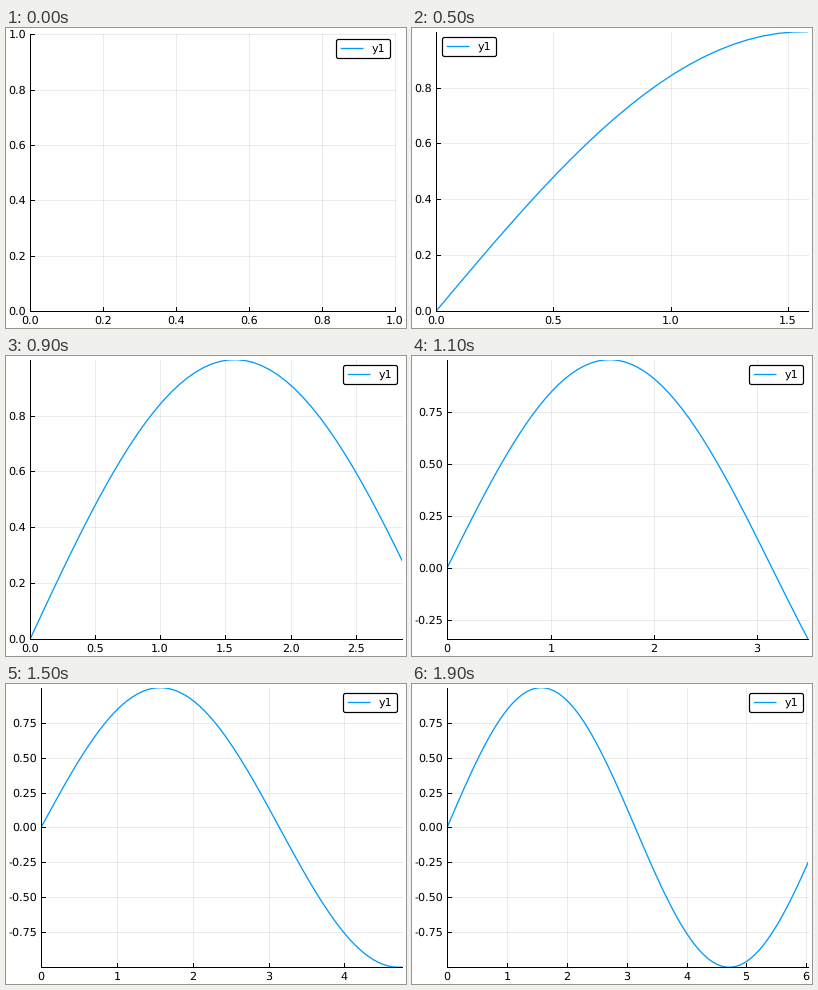
Write a matplotlib script that moves like this. It is 400 by 300 pixels and loops after 2 s.

```python
import math

import numpy as np
import matplotlib.pyplot as plt
from matplotlib.animation import FuncAnimation
from matplotlib.patches import FancyBboxPatch, Rectangle

W, H, DPI = 400, 300, 100
FRAMES, INTERVAL = 20, 100
STEP = 2 * math.pi / 99      # spacing of the sampled points
PER_FRAME = 5                # points added each frame
BLUE = "#009afa"
EM = 8 * DPI / 72
TOP, BOTTOM, RIGHT = 3.7, 283.235, 396.06
TICK = 4

plt.rcParams.update({
    "font.family": "DejaVu Sans",
    "font.size": 8,
    "text.hinting": "none",
    "axes.unicode_minus": False,
})

fig = plt.figure(figsize=(W / DPI, H / DPI), dpi=DPI, facecolor="white")
ax = fig.add_axes([0, 0, 1, 1])


def px(width):
    return width * 72 / DPI


def text_width(s):
    """Advance width of a numeric label in pixels."""
    return EM * sum({".": 0.318, "-": 0.361}.get(c, 0.636) for c in s)


def ticks(lo, hi):
    """Pick the nicest 4 to 8 ticks inside [lo, hi]."""
    best, chosen = -1, None
    span = hi - lo
    for power in (0, -1, -2):
        for q, nice in ((1, 1), (5, 0.9), (2.5, 0.5), (2, 0.7), (3, 0.2)):
            step = q * 10.0 ** power
            first = math.ceil(lo / step - 1e-9)
            last = math.floor(hi / step + 1e-9)
            n = last - first + 1
            if not 4 <= n <= 8:
                continue
            score = ((1 - abs(n - 5) / 5) / 4
                     + 0.5 * span / ((n - 1) * step) + nice / 4)
            if score > best + 1e-9:
                best = score
                chosen = [i * step for i in range(first, last + 1)]
    return chosen


def labels(values):
    for digits in range(4):
        if all(abs(round(v, digits) - v) < 1e-9 for v in values):
            return [f"{v:.{digits}f}" for v in values]


def segment(x0, y0, x1, y1, **kw):
    """Black one-pixel line on the pixel grid."""
    line, = ax.plot([x0, x1], [y0, y1], color="black", lw=px(1),
                    solid_capstyle="projecting", **kw)
    line.set_snap(True)


def draw_legend(left, top, right, at_left):
    x = round(left + 6 if at_left else right - 59)
    y = round(top + 5)
    ax.add_patch(FancyBboxPatch(
        (x + 0.5, y + 0.5), 54, 19, boxstyle="round,pad=0,rounding_size=2",
        facecolor="white", edgecolor="black", lw=px(1.2), zorder=5))
    ax.plot([x + 4.7, x + 27.5], [y + 9.5, y + 9.5], color=BLUE, lw=px(1.3),
            solid_capstyle="butt", snap=False, zorder=6)
    ax.text(x + 35.6, y + 12.5, "y1", zorder=6)


def draw(k):
    ax.clear()
    ax.set_xlim(0, W)
    ax.set_ylim(H, 0)
    ax.axis("off")

    xs = STEP * np.arange(PER_FRAME * k + 1)
    ys = np.sin(xs)
    if k:
        x_hi, y_lo, y_hi = xs[-1], ys.min(), ys.max()
        xt, yt = ticks(0, x_hi), ticks(y_lo, y_hi)
    else:
        x_hi, y_lo, y_hi = 1, 0, 1
        xt = yt = [0.2 * i for i in range(6)]
    xl, yl = labels(xt), labels(yt)

    # margins leave room for the tick labels
    left = 6.36 + max(map(text_width, yl))
    reach = 398.3 - text_width(xl[-1]) / 2
    right = min(RIGHT, left + (reach - left) * x_hi / xt[-1])
    share = (yt[-1] - y_lo) / (y_hi - y_lo)
    top = max(TOP, BOTTOM - (BOTTOM - 6.3) / share)

    def to_x(v):
        return left + (right - left) * v / x_hi

    def to_y(v):
        return BOTTOM - (BOTTOM - top) * (v - y_lo) / (y_hi - y_lo)

    for v, s in zip(xt, xl):
        x = to_x(v)
        segment(x, top, x, BOTTOM, alpha=0.08, zorder=1)
        segment(x, BOTTOM, x, BOTTOM - TICK, zorder=4)
        ax.text(round(x), 296.3, s, ha="center", va="baseline")
    for v, s in zip(yt, yl):
        y = to_y(v)
        segment(left, y, right, y, alpha=0.08, zorder=1)
        segment(left, y, left + TICK, y, zorder=4)
        ax.text(left - 4.06 - text_width(s), round(y) + 4, s, va="baseline")

    segment(left, top, left, BOTTOM, zorder=4)
    segment(left, BOTTOM, right, BOTTOM, zorder=4)

    if k:
        curve, = ax.plot(to_x(xs), to_y(ys), color=BLUE, lw=px(1.3), zorder=3)
        curve.set_clip_path(Rectangle((left, BOTTOM), right - left,
                                      top - BOTTOM, transform=ax.transData))
    draw_legend(left, top, right, 1 <= k <= 8)
    return []


anim = FuncAnimation(fig, draw, frames=FRAMES, interval=INTERVAL,
                     init_func=lambda: [], repeat=True, repeat_delay=0)
plt.show()
```
